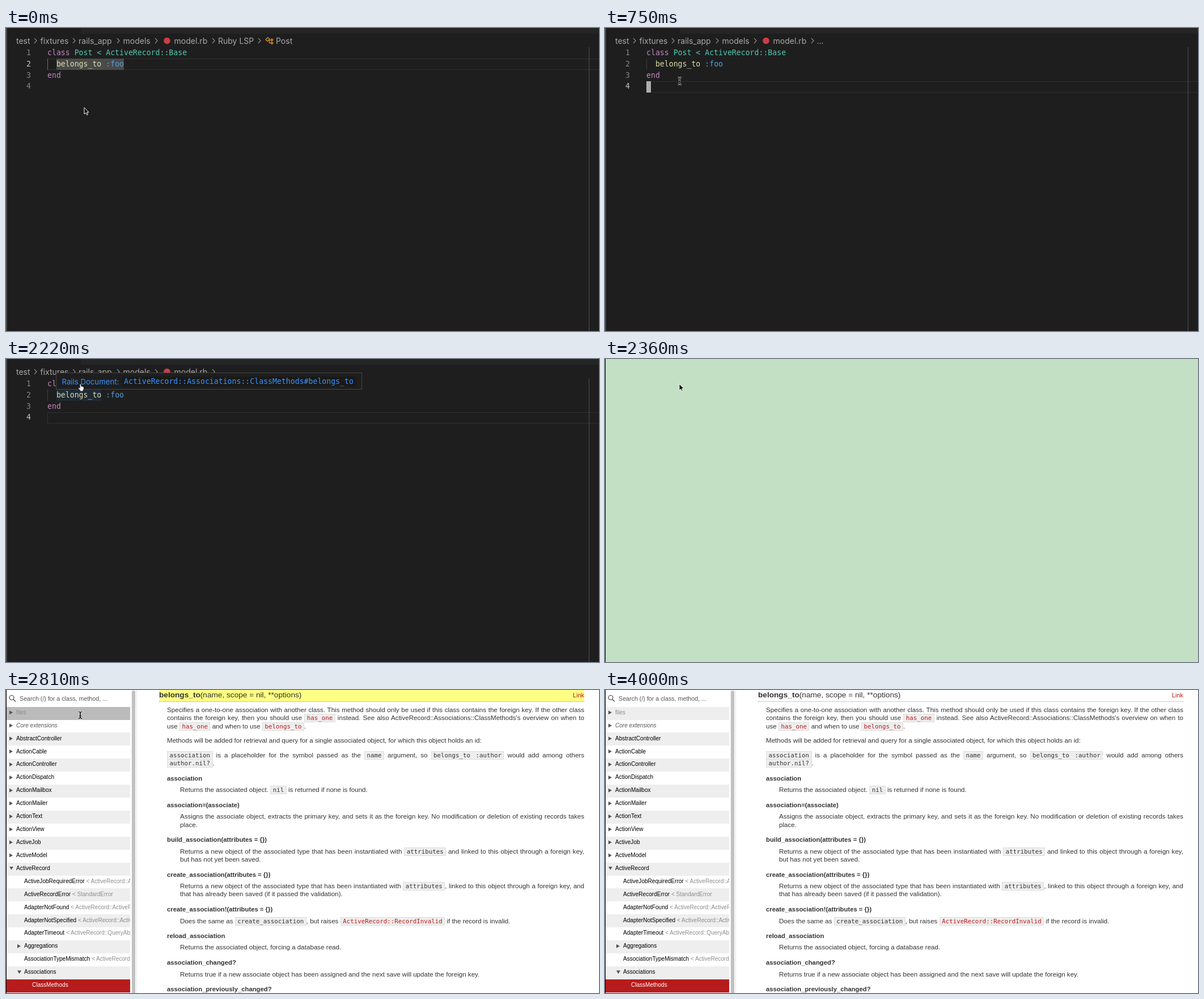
An HTML page that plays this animation: 1046 by 535 pixels, repeating every 4450 ms.

```html
<!DOCTYPE html>
<html lang="en">
<head>
<meta charset="utf-8">
<title>Hover documentation link</title>
<style>
html, body { margin: 0; width: 100%; height: 100%; overflow: hidden; background: #1e1e1e; }
#stage { position: relative; width: 1046px; height: 535px; overflow: hidden; }
#stage div, #stage svg { position: absolute; }
.scene { inset: 0; overflow: hidden; }
.t { white-space: pre; line-height: 16px; }
.ui { font: 14px/16px Inter, sans-serif; color: #a9a9a9; }
.mono { font: 13.2px/16px "DejaVu Sans Mono", monospace; }
.key { color: #c586c0; }
.type { color: #4ec9b0; }
.call { color: #dcdcaa; }
.sym { color: #569cd6; }

#tip { left: 88px; top: 24px; width: 538px; height: 28px; background: #1e1e1e; border: 1px solid #454545; }
#tip .t { color: #3794ff; }

#docs { background: #fff; color: #333; font: 11.6px/16px "Liberation Sans", Arial, sans-serif; }
.just { text-align: justify; text-align-last: justify; white-space: normal !important; }
.bold { font-weight: bold; font-size: 11.3px; }
.red { color: #be1a1a; }
code { font: 10.8px/0 "DejaVu Sans Mono", monospace; background: #eee; border: 1px solid #ddd; padding: 0 3.5px; white-space: pre; }
#head { left: 270px; top: -4px; width: 750px; height: 24px; border-bottom: 1px dotted #999; }
.row { left: 1px; width: 218px; height: 22.92px; overflow: hidden; font-size: 10.05px; color: #000; }
.row i.sup { font-style: normal; color: #8c8c8c; }
.tri { background: #555; }
</style>
</head>
<body>
<div id="stage">
  <div id="edit" class="scene"></div>
  <div id="blank" class="scene" style="background:#c4e0c4"></div>
  <div id="docs" class="scene"></div>
  <svg id="pointer" width="1046" height="535" stroke-linejoin="round">
    <g id="arrow">
      <path d="M0 0V11.5L2.7 9L4.6 13L6.4 12.2L4.7 8.3H8Z" fill="#000" stroke="#fff"/>
    </g>
    <g id="beam" fill="none">
      <path id="beamPath" d="M-3-6Q0-6 0-3.8Q0-6 3-6M0-4V4M-3 6Q0 6 0 3.8Q0 6 3 6M-1.6 1.4H1.6" stroke="#fff" stroke-width="2.6"/>
      <use href="#beamLine"/>
      <path id="beamLine" d="M-3-6Q0-6 0-3.8Q0-6 3-6M0-4V4M-3 6Q0 6 0 3.8Q0 6 3 6M-1.6 1.4H1.6" stroke="#000" stroke-width="1"/>
    </g>
    <g id="hand">
      <path d="M-2-6.2Q-.8-7 0-6L.8-2.2Q2-2.8 2.6-1.8Q4-2.2 4.3-1Q5.6-.9 5.4 .8Q5.3 3 4 4.4V6.4H-1.2V5Q-3.6 2.6-4.4 .8Q-4-.6-2.6 .2L-1.5 1.2Z" fill="#fff" stroke="#111" stroke-width=".7"/>
    </g>
  </svg>
</div>
<script>
const $ = id => document.getElementById(id);
const edit = $('edit'), docs = $('docs');

function box(parent, x, y, w, h, css = '') {
  const el = document.createElement('div');
  el.style.cssText = `left:${x}px;top:${y}px;width:${w}px;height:${h}px;${css}`;
  parent.append(el);
  return el;
}

// y is the middle of the capital letters
function text(parent, x, y, html, cls = '', css = '') {
  const el = document.createElement('div');
  el.className = 't ' + cls;
  el.style.cssText = `left:${x}px;top:${y - 8}px;${css}`;
  el.innerHTML = html;
  parent.append(el);
  return el;
}

function drawing(parent, markup) {
  parent.insertAdjacentHTML('beforeend',
    `<svg width="1046" height="535" fill="none" style="left:0;top:0">${markup}</svg>`);
  return parent.lastElementChild;
}

const chevron = x => `<path d="M${x - 2} 18l4 4.5-4 4.5" stroke="#a9a9a9" stroke-width="1.1"/>`;

// ---- editor ----
box(edit, 132, 0, 914, 10, 'background:#252526');
box(edit, 0, 0, 1.5, 535, 'background:#454545');
const lineTop = n => 54 + 19.85 * (n - 2);
const current = box(edit, 73, 0, 973, 18, 'border:solid #303030;border-width:1px 0 1px 1px');
const selection = box(edit, 88.5, 54, 119.5, 20, 'background:#4a4a4a');
const hovered = box(edit, 88.5, 54, 79.5, 20, 'background:#1f2a35');
const guide = box(edit, 73, 54, 1, 20);
box(edit, 1027.5, 34, 1.5, 501, 'background:#505050');

[[18, 'test'], [60.5, 'fixtures'], [128, 'rails_app'], [206.5, 'models'], [296.5, 'model.rb']]
  .forEach(([x, s]) => text(edit, x, 22.5, s, 'ui'));
drawing(edit, [52, 120, 198, 265, 366].map(chevron).join('') +
  '<circle cx="284" cy="22.5" r="5.8" fill="#cc3e44"/>');
const shortPath = text(edit, 373.5, 22.5, '...', 'ui');
const fullPath = box(edit, 0, 0, 1046, 34);
text(fullPath, 374, 22.5, 'Ruby LSP', 'ui');
text(fullPath, 476, 22.5, 'Post', 'ui');
drawing(fullPath, chevron(447) +
  '<g stroke="#ee9d28" stroke-width="1.2"><path d="M458 20.5l4-4 3 3-4 4zM463 21.5h4M464.5 21.5v5h2.5"/>' +
  '<path d="M467 21l2-2 2 2-2 2zM467 26.5l2-2 2 2-2 2z"/></g>');

const span = (cls, s) => `<span class="${cls}">${s}</span>`;
const lines = [
  span('key', 'class') + span('type', ' Post &lt; ActiveRecord::Base'),
  '  ' + span('call', 'belongs_to') + ' ' + span('sym', ':foo'),
  span('key', 'end'),
  ''
];
const numbers = lines.map((s, i) => {
  const y = 43.8 + 19.85 * i;
  text(edit, 73, y, s, 'mono');
  return text(edit, 36, y, i + 1, 'mono');
});
const caret = box(edit, 73, 94, 7.5, 19.5, 'background:#aeafad');

const tip = box(edit, 88, 24, 538, 28);
tip.id = 'tip';
box(tip, 115, 6, 413, 17, 'background:#191919;border-radius:3px');
text(tip, 9.5, 14.5, 'Rails Document:', 'ui', 'font-size:13.2px');
text(tip, 119, 14.5, 'ActiveRecord::Associations::ClassMethods#belongs_to', 'mono');

// ---- blank page ----
box($('blank'), 0, 0, 1, 535, 'background:#000');

// ---- documentation: sidebar ----
// depth, name, parent class, arrow: > closed, v open
const tree = [
  [0, 'files', '', '>'], [0, '<em>Core extensions</em>', '', '>'],
  ...['AbstractController', 'ActionCable', 'ActionController', 'ActionDispatch', 'ActionMailbox',
    'ActionMailer', 'ActionText', 'ActionView', 'ActiveJob', 'ActiveModel'].map(s => [0, s, '', '>']),
  [0, 'ActiveRecord', '', 'v'],
  [1, 'ActiveJobRequiredError', 'ActiveRecord::ActiveRecordError'],
  [1, 'ActiveRecordError', 'StandardError'],
  [1, 'AdapterNotFound', 'ActiveRecord::ActiveRecordError'],
  [1, 'AdapterNotSpecified', 'ActiveRecord::ActiveRecordError'],
  [1, 'AdapterTimeout', 'ActiveRecord::QueryAborted'],
  [1, 'Aggregations', '', '>'],
  [1, 'AssociationTypeMismatch', 'ActiveRecord::ActiveRecordError'],
  [1, 'Associations', '', 'v'],
  [2, 'ClassMethods', ''],
  [2, '', '']
];
const arrows = {
  '>': ['0 0, 100% 50%, 0 100%', 6, 7],
  'v': ['0 0, 100% 0, 50% 100%', 7, 6]
};
const rows = tree.map(([depth, name, sup, arrow], i) => {
  const active = name === 'ClassMethods';
  const row = box(docs, 1, 29.6 + 22.92 * i, 218, 22.92,
    `background:${active ? '#b71c1c' : i % 2 ? '#fff' : '#eee'}`);
  row.className = 'row';
  const color = active ? '#fff' : i === 0 ? '#8c8c8c' : i === 1 ? '#555' : '#000';
  text(row, 17 + 14 * depth, 10.2, name + (sup && ` <i class="sup">&lt; ${sup}</i>`), '', `color:${color}`);
  if (arrow) {
    const [shape, w, h] = arrows[arrow];
    box(row, 5 + 14 * depth, 10.2 - h / 2, w, h, `clip-path:polygon(${shape})`).className = 'tri';
  }
  return row;
});
drawing(docs, '<g stroke="#444" stroke-width="1.2"><circle cx="10" cy="13.5" r="4"/><path d="M13 16.5l4 4"/></g>');
text(docs, 24, 14.7, 'Search (/) for a class, method, ...', '', 'font-size:10.7px;color:#555');
box(docs, 220, 0, 10, 535, 'background:#fafafa;border-right:1px solid #e6e6e6');
box(docs, 222, 1, 6, 540, 'background:#c1c1c1;border-radius:3px');
box(docs, 0, 0, 1, 535, 'background:#000');

// ---- documentation: article ----
const head = box(docs, 270, -4, 750, 24);
head.id = 'head';
text(head, 0, 13.3, '<b>belongs_to</b>(name, scope = nil, **options)', '', 'font-size:13.65px');
text(head, 730, 12.7, 'Link', 'red', 'font-size:10.8px');

// `x` is code, ~x~ is linked code
const rich = s => s.replace(/`(.+?)`/g, '<code>$1</code>').replace(/~(.+?)~/g, '<code class="red">$1</code>');
const para = (x, y, ...parts) => parts.forEach((s, i) => {
  const full = i < parts.length - 1;
  text(docs, x, y + 14.6 * i, rich(s), full ? 'just' : '', full ? `width:${1020 - x}px` : '');
});
para(284, 34.5,
  'Specifies a one-to-one association with another class. This method should only be used if this class contains the foreign key. If the other class',
  "contains the foreign key, then you should use ~has_one~ instead. See also ActiveRecord::Associations::ClassMethods's overview on when to",
  'use ~has_one~ and when to use ~belongs_to~.');
para(284, 88.7, 'Methods will be added for retrieval and query for a single associated object, for which this object holds an id:');
para(284, 114.7,
  '`association` is a placeholder for the symbol passed as the `name` argument, so `belongs_to :author` would add among others',
  '`author.nil?`.');

const entries = [
  [156, 'association', 175.7, 'Returns the associated object. `nil` is returned if none is found.'],
  [202.7, 'association=(associate)', 223.2,
    'Assigns the associate object, extracts the primary key, and sets it as the foreign key. No modification or deletion of existing records takes',
    'place.'],
  [264, 'build_association(attributes = {})', 284.5,
    'Returns a new object of the associated type that has been instantiated with `attributes` and linked to this object through a foreign key,',
    'but has not yet been saved.'],
  [325.5, 'create_association(attributes = {})', 345.5,
    'Returns a new object of the associated type that has been instantiated with `attributes`, linked to this object through a foreign key, and',
    'that has already been saved (if it passed the validation).'],
  [386.7, 'create_association!(attributes = {})', 407.5,
    'Does the same as `create_association`, but raises ~ActiveRecord::RecordInvalid~ if the record is invalid.'],
  [433.5, 'reload_association', 454, 'Returns the associated object, forcing a database read.'],
  [480.7, 'association_changed?', 501.5,
    'Returns true if a new associate object has been assigned and the next save will update the foreign key.'],
  [527.5, 'association_previously_changed?', 548, '']
];
for (const [y, title, bodyY, ...body] of entries) {
  text(docs, 284, y, title, 'bold');
  para(307, bodyY, ...body);
}

// ---- timeline ----
const LOOP = 4450, DOCS_AT = 2510;
// time, scene, pointer, x, y
const steps = [
  [0, 'edit', 'arrow', 138, 140.5],
  [450, 'edit', 'beam', 140, 141],
  [600, 'edit', 'beam', 138, 138],
  [750, 'edit', 'beam', 131.7, 93.5],
  [900, 'edit', 'beam', 129, 64],
  [1040, 'edit', 'beam', 128.5, 63],
  [1180, 'edit', 'beam', 128.5, 63],
  [1330, 'edit', 'beam', 128.5, 63],
  [1480, 'edit', 'beam', 128.5, 63],
  [1780, 'edit', 'beam', 128.5, 60],
  [1920, 'edit', 'beam', 131.5, 52],
  [2070, 'edit', 'hand', 132, 50.5],
  [2360, 'blank', 'arrow', 131, 44],
  ...[0, 150, 300, 450, 600, 750, 1040].map(d => [DOCS_AT + d, 'docs', 'beam', 131, 44.3]),
  [3700, 'docs', 'beam', 137, 57],
  [3850, 'docs', 'beam', 626, 536],
  [4000, 'docs', '', 0, 0]
];

const fade = head.animate([{ backgroundColor: '#ff0' }, { backgroundColor: '#fff' }],
  { duration: 1000, easing: 'ease', fill: 'both' });
fade.pause();

const show = (el, on) => { el.style.visibility = on ? 'visible' : 'hidden'; };
const within = (t, a, b) => t >= a && t < b;

function draw(now) {
  const [t, scene, pointer, x, y] = steps.findLast(s => s[0] <= now);
  for (const id of ['edit', 'blank', 'docs']) $(id).style.display = id === scene ? '' : 'none';
  for (const id of ['arrow', 'beam', 'hand']) {
    $(id).style.display = id === pointer ? '' : 'none';
    $(id).setAttribute('transform', `translate(${x} ${y})`);
  }
  const line = t < 450 ? 2 : 4;
  current.style.top = lineTop(line) + 'px';
  numbers.forEach((el, i) => { el.style.color = i + 1 === line ? '#c6c6c6' : '#858585'; });
  guide.style.background = line === 2 ? '#707070' : '#404040';
  show(selection, line === 2);
  show(caret, within(t, 450, 1040) || within(t, 1480, 1920));
  show(fullPath, t < 600);
  show(shortPath, t >= 600);
  show(hovered, t >= 1180);
  tip.style.opacity = t < 1180 ? 0 : t < 1330 ? 0.6 : 1;
  rows[0].style.background = t < 3850 ? '#bbb' : '#eee';
  fade.currentTime = Math.min(1000, Math.max(0, t - DOCS_AT));
}

const start = performance.now();
function tick() {
  draw((performance.now() - start) % LOOP);
  requestAnimationFrame(tick);
}
tick();
</script>
</body>
</html>
```
